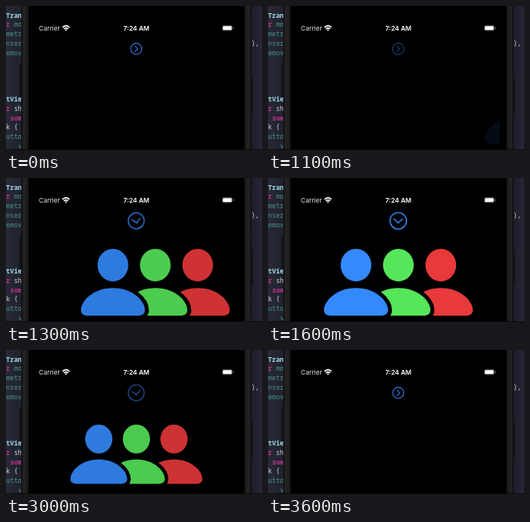
These frames come from a looping animation (320x181 px, 5600 ms). An HTML page:

```html
<!DOCTYPE html>
<html lang="en">
<head>
<meta charset="utf-8">
<title>Transition demo</title>
<style>
html, body { margin: 0; width: 100%; height: 100%; overflow: hidden; background: #000; }
svg { display: block; width: 100vw; height: 100vh; }
.code { font: 8.25px "Noto Sans Mono", "DejaVu Sans Mono", monospace; }
.bar { font: 8.1px Inter, Roboto, sans-serif; }
.kw { fill: #b8358a; font-weight: 700; }
.type { fill: #a0d6e8; font-weight: 700; }
.call { fill: #4a9389; }
.plain { fill: #cdd0d6; }
</style>
</head>
<body>
<svg viewBox="0 0 320 181" preserveAspectRatio="none">
  <defs>
    <linearGradient id="bezel">
      <stop offset="0" stop-color="#0b0b0d"/>
      <stop offset=".01" stop-color="#242426"/>
      <stop offset=".03" stop-color="#1a1a1c"/>
      <stop offset=".97" stop-color="#1a1a1c"/>
      <stop offset=".99" stop-color="#242426"/>
      <stop offset="1" stop-color="#0b0b0d"/>
    </linearGradient>
    <linearGradient id="editor">
      <stop offset="0" stop-color="#282a36"/>
      <stop offset=".06" stop-color="#1f212b"/>
      <stop offset=".955" stop-color="#1e1c28"/>
      <stop offset="1" stop-color="#282638"/>
    </linearGradient>
    <clipPath id="content"><rect x="28" y="0" width="261.5" height="181"/></clipPath>
    <path id="body" d="M-31 173H31C37 173 40 170.5 40 166C40 155 25 138.3 0 138.3S-40 155-40 166C-40 170.5-37 173-31 173Z"/>
  </defs>

  <rect width="320" height="181" fill="url(#editor)"/>
  <g id="code" class="code"></g>

  <rect x="16.5" y="73" width="4" height="42" rx="1" fill="#141519"/>
  <rect x="305" y="90" width="4" height="45" rx="1" fill="#141519"/>
  <rect x="19" y="-10" width="288" height="201" fill="url(#bezel)"/>
  <rect x="28" y="-10" width="270.5" height="201" fill="#000"/>

  <g class="bar" fill="#fff">
    <text x="41" y="30.8" fill="#e4e4e4">Carrier</text>
    <text x="163" y="30.8" text-anchor="middle" font-weight="600">7:24 AM</text>
    <g fill="none" stroke="#fff" stroke-width="1.5">
      <path d="M70.6 27Q75 22.8 79.4 27"/>
      <path d="M72.3 28.9Q75 26.3 77.7 28.9"/>
    </g>
    <path d="M73.5 29.9Q75 28.7 76.5 29.9L75 31.4Z"/>
    <rect x="270.2" y="24.4" width="12.8" height="6.6" rx="2" fill="none" stroke="#777" stroke-width=".5"/>
    <rect x="271" y="25.2" width="11.2" height="5" rx="1.3"/>
    <rect x="283.7" y="26.6" width=".9" height="2.2" rx=".4" fill="#888"/>
  </g>

  <g id="button" fill="none" stroke="#3079de" stroke-width="1.08" stroke-linecap="round" stroke-linejoin="round">
    <circle r="6.9"/>
    <path d="M-1.5-3.4L1.9 0L-1.5 3.4"/>
  </g>

  <g clip-path="url(#content)">
    <g id="people" stroke="#000" stroke-width="10"></g>
  </g>
  <rect y="180" width="320" height="1" fill="#0b0b0d"/>
</svg>
<script>
const LOOP = 5600, STEP = 100, DURATION = 350;
const SHOW = 1030, HIDE = 2918;
const CENTER = { x: 163, y: 131 }, TRAVEL = 220;
const $ = id => document.getElementById(id);

// Each line: x, baseline, then class and text pairs.
const LINES = [
  [0, 14.6, 'type', 'Tran'],
  [0, 26.3, 'kw', 'r ', 'call', 'mo'],
  [0, 38, 'call', 'metr'],
  [0, 49.8, 'call', 'nser'],
  [0, 61.6, 'call', 'emov'],
  [0, 120, 'type', 'tVie'],
  [0, 131.8, 'kw', 'r ', 'plain', 'sh'],
  [5.2, 143.6, 'kw', 'som'],
  [0, 155.4, 'plain', 'k {'],
  [0, 167, 'call', 'utto'],
  [15.2, 178.8, 'call', 'v'],
  [306.5, 49.8, 'plain', '),']
];
$('code').innerHTML = LINES.map(([x, y, ...parts]) => {
  let spans = '';
  for (let i = 0; i < parts.length; i += 2)
    spans += `<tspan class="${parts[i]}">${parts[i + 1]}</tspan>`;
  return `<text x="${x}" y="${y}">${spans}</text>`;
}).join('');

// Back to front; the black outline cuts the gap between neighbours.
$('people').innerHTML = [[216, '#e8393b'], [163, '#55e65a'], [110, '#348afb']].map(([x, color]) =>
  `<g transform="translate(${x} 0)" fill="${color}">
    <use href="#body"/><use href="#body" stroke="none"/>
    <ellipse cy="109.4" rx="19.2" ry="20.5" stroke="none"/>
  </g>`).join('');

const clamp = v => Math.min(1, Math.max(0, v));

// Cubic bezier (.42, 0, .58, 1)
function easeInOut(x) {
  if (x <= 0 || x >= 1) return clamp(x);
  let lo = 0, hi = 1, u = .5;
  for (let i = 0; i < 24; i++) {
    u = (lo + hi) / 2;
    const bx = 3 * .42 * u * (1 - u) ** 2 + 3 * .58 * u * u * (1 - u) + u ** 3;
    if (bx < x) lo = u; else hi = u;
  }
  return u * u * (3 - 2 * u);
}

const progress = (t, start) => easeInOut((t - start) / DURATION);

// The button dims on touch and brightens after release.
function pressOpacity(t, start) {
  if (t < start - 50) return 1;
  return .4 + .6 * clamp((t - start) / 330);
}

function draw(t) {
  const shown = progress(t, SHOW), hidden = progress(t, HIDE);
  const open = shown - hidden;

  $('button').setAttribute('transform',
    `translate(162.8 53.8) rotate(${90 * open}) scale(${1 + .5 * open})`);
  $('button').setAttribute('opacity', pressOpacity(t, SHOW) * pressOpacity(t, HIDE));

  const { x, y } = CENTER;
  $('people').setAttribute('transform',
    `translate(${x + TRAVEL * (1 - shown)} ${y}) scale(${1 - hidden}) translate(${-x} ${-y})`);
  $('people').setAttribute('opacity', open);
}

const origin = performance.now();
function tick() {
  const t = (performance.now() - origin) % LOOP;
  draw(Math.floor(t / STEP) * STEP);
  requestAnimationFrame(tick);
}
draw(0);
requestAnimationFrame(tick);
</script>
</body>
</html>
```
